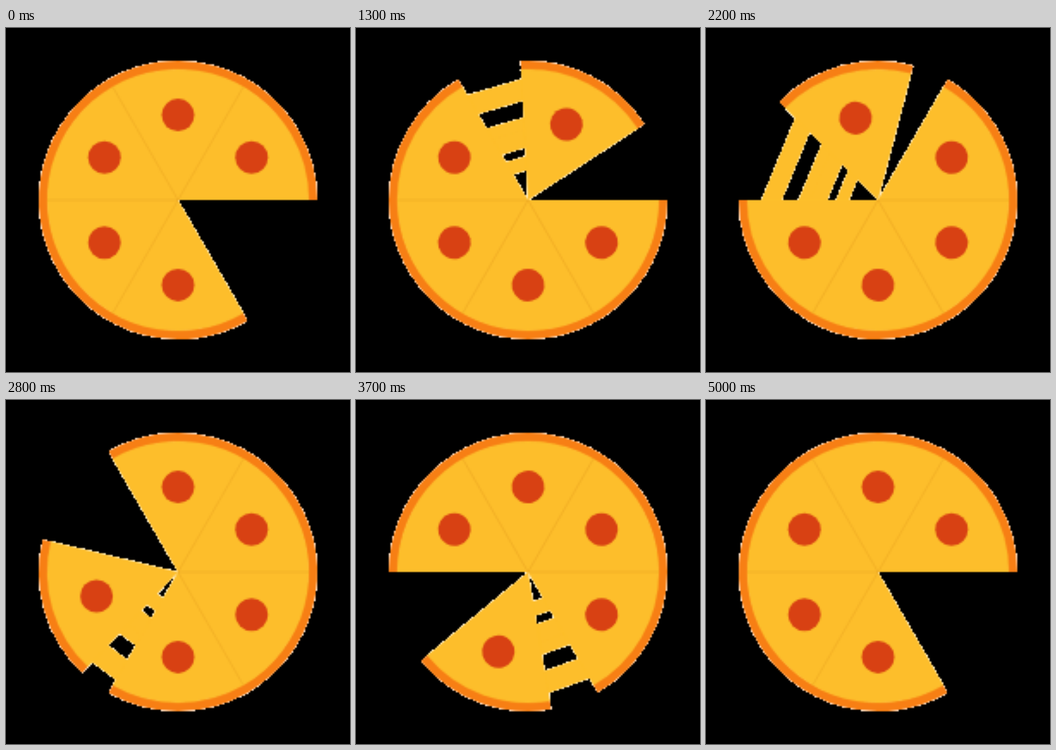
These frames come from a looping animation (600x600 px, 5.1 s). An HTML page with a canvas:

```html
<!DOCTYPE html>
<html lang="en">
<head>
<meta charset="utf-8">
<title>Pizza loader</title>
<style>
  html, body { margin: 0; width: 100%; height: 100%; overflow: hidden; background: #000; }
  canvas { display: block; width: 600px; height: 600px; }
</style>
</head>
<body>
<canvas id="stage" width="600" height="600"></canvas>
<script>
const SIZE = 600, GRID = 200;
const stage = document.getElementById('stage').getContext('2d');
const sprite = document.createElement('canvas');
sprite.width = sprite.height = GRID;
const ctx = sprite.getContext('2d', { willReadFrequently: true });

const LOOP = 5100, STEP = 100;
const SLICE = Math.PI / 3;
const RADIUS = 228, RIM = 243;
const COLORS = { cheese: '#fdbe2b', crust: '#f77f14', meat: '#d84113', seam: 'rgba(226, 150, 28, 0.5)' };

// Each slice rests for a while, then speeds up exponentially.
const REST_TICKS = 20, CYCLE_TICKS = 51, GROWTH = 1.07;

// Slightly uneven pace: [step, tick]
const PACE = [[0, 9], [28, 187], [37, 242], [43, 283], [50, 326]];

// Cheese strands: [distance from the centre, thickness]
const STRANDS = [[0.9, 44], [0.6, 36.5], [0.5, 36.5], [0.3, 28.5]];
const STRAND_REACH = 0.19;

// Pixels covered less than this stay empty.
const MIN_COVER = 0.2;

function tickAt(step) {
  const i = PACE.findIndex(([s]) => s >= step);
  if (i <= 0) return PACE[0][1];
  const [s0, t0] = PACE[i - 1], [s1, t1] = PACE[i];
  return Math.round(t0 + (t1 - t0) * (step - s0) / (s1 - s0));
}

function polar(radius, angle) {
  return [radius * Math.cos(angle), radius * Math.sin(angle)];
}

function line(from, to, color, width) {
  ctx.beginPath();
  ctx.moveTo(...from);
  ctx.lineTo(...to);
  ctx.strokeStyle = color;
  ctx.lineWidth = width;
  ctx.stroke();
}

function drawStrands(start, end, progress) {
  for (const [distance, thickness] of STRANDS) {
    const r = RADIUS * distance;
    line(polar(r, start - STRAND_REACH), polar(r, end + STRAND_REACH),
      COLORS.cheese, thickness * (1 - 0.32 * progress));
  }
}

function drawSlices(start, count) {
  const end = start + SLICE * count;
  const inner = RADIUS - 2;

  ctx.beginPath();
  ctx.arc(0, 0, (inner + RIM) / 2, start, end);
  ctx.strokeStyle = COLORS.crust;
  ctx.lineWidth = RIM - inner;
  ctx.stroke();

  ctx.beginPath();
  ctx.moveTo(0, 0);
  ctx.arc(0, 0, RADIUS, start, end);
  ctx.closePath();
  ctx.fillStyle = ctx.strokeStyle = COLORS.cheese;
  ctx.lineWidth = 0.8;
  ctx.fill();
  ctx.stroke();

  for (let i = 0; i < count; i++) {
    const angle = start + SLICE * i;
    if (i > 0) line([0, 0], polar(RADIUS, angle), COLORS.seam, 1.8);
    ctx.beginPath();
    ctx.arc(...polar(RADIUS * 0.65, angle + SLICE / 2), RADIUS / 8, 0, Math.PI * 2);
    ctx.fillStyle = COLORS.meat;
    ctx.fill();
  }
}

// Hard silhouette: edge pixels are blended with white, faint ones turn black.
function hardenEdges() {
  const image = ctx.getImageData(0, 0, GRID, GRID);
  const { data } = image;
  for (let p = 0; p < data.length; p += 4) {
    const cover = data[p + 3] / 255;
    for (let c = p; c < p + 3; c++) {
      data[c] = cover < MIN_COVER ? 0 : data[c] * cover + 255 * (1 - cover);
    }
    data[p + 3] = 255;
  }
  ctx.putImageData(image, 0, 0);
}

function draw(time) {
  const tick = tickAt(Math.floor((time % LOOP) / STEP));
  const turn = Math.floor(tick / CYCLE_TICKS);
  const moved = Math.max(0, tick % CYCLE_TICKS - REST_TICKS);
  const progress = (GROWTH ** moved - 1) / 7;

  ctx.resetTransform();
  ctx.clearRect(0, 0, GRID, GRID);
  ctx.translate(GRID / 2, GRID / 2);
  ctx.scale(GRID / SIZE, GRID / SIZE);
  ctx.rotate(-turn * SLICE);

  if (progress > 0) {
    const start = SLICE * (5 + progress);
    drawStrands(SLICE * 5, start, progress);
    drawSlices(start, 1);
    drawSlices(SLICE, 4);
  } else {
    drawSlices(SLICE, 5);
  }

  hardenEdges();
  stage.drawImage(sprite, 0, 0, SIZE, SIZE);
}

const began = performance.now();
function loop() {
  draw(performance.now() - began);
  requestAnimationFrame(loop);
}
loop();
</script>
</body>
</html>
```
